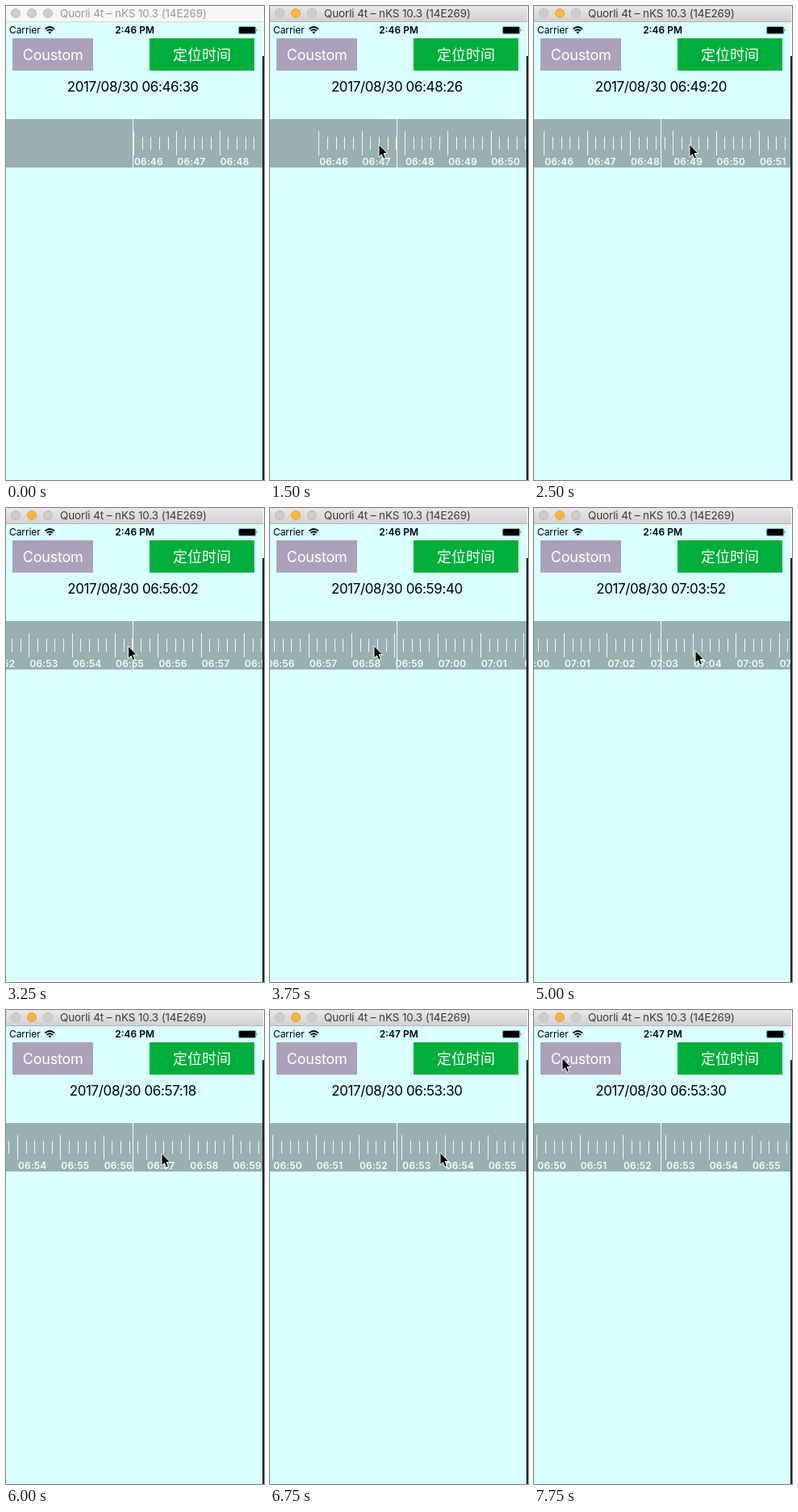
Animation, 320 px wide and 587 px high, one loop 8000 ms. Source, as an HTML page:

```html
<!DOCTYPE html>
<html lang="en">
<head>
<meta charset="utf-8">
<title>Time ruler</title>
<style>
html, body { margin: 0; width: 100%; height: 100%; overflow: hidden; background: #d9ffff; }
svg { display: block; width: 100vw; height: 100vh; }
text { font-family: Inter, "Liberation Sans", sans-serif; }
.cjk { font-family: "Noto Sans CJK SC", "Noto Sans CJK", sans-serif; font-weight: 300; }
</style>
</head>
<body>
<svg viewBox="0 0 320 587">
  <defs>
    <linearGradient id="bar" x2="0" y2="1">
      <stop offset="0" stop-color="#e9e7e9"/>
      <stop offset="1" stop-color="#d1cfd1"/>
    </linearGradient>
    <clipPath id="clip"><rect y="140" width="318" height="60"/></clipPath>
  </defs>
  <rect width="320" height="587" fill="#d9ffff"/>

  <rect x="318" width="2" height="62" fill="#fafafa"/>
  <rect x="318" y="62" width="2" height="525" fill="#1d2429"/>

  <rect id="titleBar" width="319" height="20"/>
  <rect id="titleEdge" y="19" width="319" height="1"/>
  <g id="lights">
    <circle cx="12" cy="9" r="5.5"/>
    <circle cx="32" cy="9" r="5.5"/>
    <circle cx="52" cy="9" r="5.5"/>
  </g>
  <text id="title" x="67" y="14" font-size="13.5" letter-spacing="-.12">Quorli 4t – nKS 10.3 (14E269)</text>

  <text x="4" y="34" font-size="12" letter-spacing="-.1">Carrier</text>
  <g fill="none" stroke="#000" stroke-width="1.7">
    <path d="M48.5 28.6Q54.3 23.4 60.1 28.6M50.6 30.9Q54.3 27.6 58 30.9"/>
    <path d="M52.3 32.3Q54.3 30.8 56.3 32.3L54.3 34.4Z" fill="#000" stroke="none"/>
  </g>
  <text id="clock" x="159.7" y="34" font-size="12" font-weight="600" text-anchor="middle"></text>
  <rect x="288.4" y="25.4" width="21.6" height="9.2" rx="1.8" fill="none" stroke="#000" stroke-opacity=".5" stroke-width=".7"/>
  <rect x="289.1" y="26.1" width="20.2" height="7.8" rx=".8"/>
  <path d="M310.8 28.4q1.6 1.6 0 3.2z"/>

  <rect x="8" y="40" width="100" height="40" fill="#aca1bb"/>
  <text x="58.2" y="66.5" font-size="18" letter-spacing="-.2" fill="#fff" text-anchor="middle">Coustom</text>
  <rect x="178" y="40" width="130" height="40" fill="#00ae3b"/>
  <text class="cjk" x="243" y="66.8" font-size="18" fill="#fff" text-anchor="middle">定位时间</text>
  <text id="date" x="157.4" y="106" font-size="17" letter-spacing="-.4" text-anchor="middle"></text>

  <rect y="140" width="318" height="60" fill="#99b0b0"/>
  <g clip-path="url(#clip)">
    <path id="ticks" fill="none" stroke="#eefafa"/>
    <g id="labels" font-size="12" font-weight="600" letter-spacing=".15" fill="#f2fcfc"></g>
    <path d="M157.5 140V200" stroke="#f4fcfc"/>
  </g>

  <path id="cursor" d="M0 -.5V15L3.5 11.8L5.9 17.2L8.5 16.1L6.1 10.6H10.8Z" stroke="#fff" stroke-linejoin="round"/>
</svg>
<script>
const $ = id => document.getElementById(id);
const LOOP = 8000, STEP = 250;
const START = (6 * 60 + 46) * 60 + 36;
const MINUTE = 160 / 3, ORIGIN = 158;

// turning points: time in ms, seconds scrolled, pointer x, pointer y
const KEYS = [
  [500, 0, 262, 314],
  [750, 0, 233, 176],
  [1500, 110, 135, 172],
  [2500, 164, 193, 172],
  [3750, 784, 129, 171],
  [5000, 1036, 200, 177],
  [6000, 642, 193, 178],
  [6750, 414, 211, 177],
  [7000, 414, 211, 177],
  [7750, 414, 35, 60]
];

const pad = n => String(n).padStart(2, "0");
const hhmm = s => pad(Math.floor(s / 3600)) + ":" + pad(Math.floor(s / 60) % 60);
const ease = p => p * p * (3 - 2 * p);

const labels = Array.from({ length: 8 }, () => {
  const el = document.createElementNS("http://www.w3.org/2000/svg", "text");
  el.setAttribute("y", 197);
  return $("labels").appendChild(el);
});

function pose(t) {
  const i = KEYS.findIndex(k => k[0] > t);
  if (i === 0) return KEYS[0];
  if (i < 0) return KEYS[KEYS.length - 1];
  const a = KEYS[i - 1], b = KEYS[i], p = ease((t - a[0]) / (b[0] - a[0]));
  return a.map((v, j) => v + (b[j] - v) * p);
}

function drawRuler(scrolled) {
  const left = ORIGIN - scrolled / 60 * MINUTE;
  const first = Math.max(0, Math.floor(-left / MINUTE) - 1);
  let d = "";
  labels.forEach((el, i) => {
    const n = first + i, x = left + n * MINUTE;
    for (let j = 0; j < 5; j++) {
      const tx = Math.round(x + j * MINUTE / 5) + 0.5;
      d += `M${tx} ${j ? "162V178" : "155V185"}`;
    }
    el.setAttribute("x", x + 1);
    el.textContent = hhmm(START + n * 60);
  });
  $("ticks").setAttribute("d", d);
}

function drawWindow(active) {
  $("titleBar").setAttribute("fill", active ? "url(#bar)" : "#f6f6f6");
  $("titleEdge").setAttribute("fill", active ? "#b5b3b5" : "#d6d6d6");
  $("title").setAttribute("fill", active ? "#3d3d3d" : "#979797");
  [...$("lights").children].forEach((c, i) => {
    const lit = active && i === 1;
    c.setAttribute("fill", lit ? "#fdb53c" : "#cecdce");
    c.setAttribute("stroke", lit ? "#e5a136" : "#bdbbbd");
  });
}

function render(ms) {
  const t = Math.floor(ms % LOOP / STEP) * STEP;
  const [, scrolled, x, y] = pose(t);
  const now = START + Math.round(scrolled);
  drawWindow(t >= 750);
  drawRuler(scrolled);
  $("clock").textContent = t < 6250 ? "2:46 PM" : "2:47 PM";
  $("date").textContent = `2017/08/30 ${hhmm(now)}:${pad(now % 60)}`;
  $("cursor").setAttribute("transform", `translate(${x} ${y})`);
  $("cursor").setAttribute("visibility", t < 500 ? "hidden" : "visible");
}

const begin = performance.now();
function loop() {
  render(performance.now() - begin);
  requestAnimationFrame(loop);
}
loop();
</script>
</body>
</html>
```
